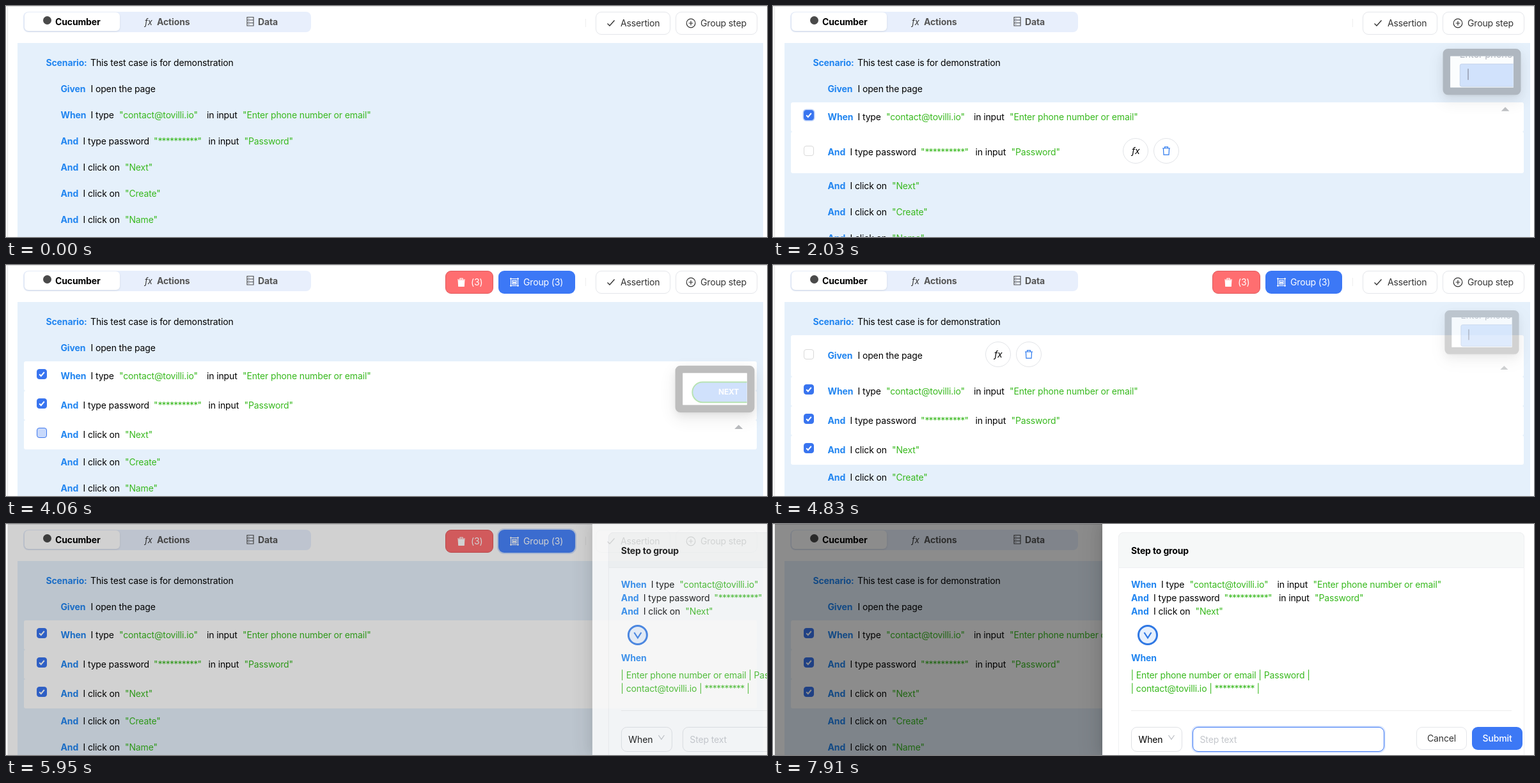
An HTML page that plays this animation: 1190 by 362 pixels, repeating every 8 s.

```html
<!DOCTYPE html>
<html lang="en">
<head>
<meta charset="utf-8">
<title>Group steps</title>
<style>
  html, body { margin: 0; width: 100%; height: 100%; overflow: hidden; background: #fff; }
  #stage { position: absolute; left: 0; top: 0; width: 1190px; height: 362px; overflow: hidden;
    font: 14px/20px Inter, "Noto Sans", sans-serif; letter-spacing: -.14px; color: #000; }
  #stage div, #stage span, #stage svg { position: absolute; box-sizing: border-box; white-space: pre; }
  svg { overflow: visible; fill: none; stroke-width: 1.2; }
  .key { color: #2185f0; font-weight: 700; }
  .str { color: #38b91e; }
  .bold { font-weight: 700; }
  .tab { color: #555; font-weight: 700; }
  .btn { color: #333; }
  .white { color: #fff; }
  .medium { font-weight: 500; }
  .hint { color: #c3c6cb; }
  .fx { font-style: italic; }
  .small { font-size: 13px; }
  .stars { font-style: normal; letter-spacing: -.8px; }
</style>
</head>
<body>
<div id="stage"></div>
<script>
const stage = document.getElementById('stage');
const LOOP = 8000, STEP = 70;
const BLUE = '#3c78f5';
const EMAIL = 'contact@tovilli.io', STARS = '<i class="stars">**********</i>';
const SHADOW = '0 6px 16px rgba(0,0,0,.08),0 3px 6px -4px rgba(0,0,0,.12),0 9px 28px 8px rgba(0,0,0,.05)';

// Each step: text end, then [x, text, class] parts
const click = (name, end) => [end, [86.5, 'And', 'key'], [121.5, 'I click on'], [187, `"${name}"`, 'str']];
const steps = [
  [232, [86.5, 'Given', 'key'], [133.5, 'I open the page']],
  [569, [86.5, 'When', 'key'], [133.5, 'I type'], [178, `"${EMAIL}"`, 'str'], [315, 'in input'],
    [371, '"Enter phone number or email"', 'str']],
  [447, [86.5, 'And', 'key'], [121.5, 'I type password'], [232, `"${STARS}"`, 'str'], [317.5, 'in input'],
    [373.5, '"Password"', 'str']],
  click('Next', 229), click('Create', 242), click('Name', 237)
];

// [step, pointer enters, pointer leaves]
const hovers = [[1, 1050, 2006], [2, 2006, 3006], [3, 3006, 4052], [2, 4200, 4460], [1, 4460, 4760], [0, 4760, 4895]];
const checkTimes = { 1: 1410, 2: 2810, 3: 4000 };

const ramp = (t, start, length) => Math.min(1, Math.max(0, (t - start) / length));
const easeOut = u => 1 - (1 - u) ** 2.2;

const box = (x, y, w, h, css = '', inner = '') =>
  `<div style="left:${x}px;top:${y}px;width:${w}px;height:${h}px;${css}">${inner}</div>`;
const text = (x, cy, s, cls = '') =>
  `<span class="${cls}" style="left:${x - 1}px;top:${cy - 10}px">${s}</span>`;
const icon = (cx, cy, color, shape) =>
  `<svg style="left:${cx}px;top:${cy}px" width="1" height="1" stroke="${color}">${shape}</svg>`;
const path = (d, extra = '') => `<path d="${d}" ${extra}/>`;
const button = (x, w, css = 'border:1px solid #e4e6ea;background:#fff', y = 8.5) =>
  box(x, y, w, 36, `border-radius:9px;${css}`);
const stepText = (step, dx, cy) => step.slice(1).map(([x, s, cls]) => text(x + dx, cy, s, cls)).join('');

const trash = path('M-6 -4H6M-2.5 -4V-6.2H2.5V-4M-4.6 -4L-4 6.2H4L4.6 -4');
const trashSolid = path('M-6 -4H6M-2 -4V-6H2V-4') + path('M-4.8 -2.6H4.8L4.2 6.4H-4.2Z', 'fill="#fff"');
const tick = path('M-5.5 .5L-2 4L5.5 -4.5', 'stroke-width="1.4"');
const plus = '<circle r="6.8"/>' + path('M-3.4 0H3.4M0 -3.4V3.4');
const sheet = path('M-5 -6.5H5V7H-5ZM-5 -2H5M-5 2.5H5M-2.8 -4.2h1M-2.8 .3h1M-2.8 4.8h1');
const groupIcon = path('M-5.5 -5.5H5.5V5.5H-5.5ZM-3 -2.8H3V-.4H-3ZM-3 1.2H3V3.2H-3Z') +
  path('M-7 -5.5h3M-5.5 -7v3M7 -5.5h-3M5.5 -7v3M-7 5.5h3M-5.5 7v-3M7 5.5h-3M5.5 7v-3');

function header(t, count) {
  let out = box(27, 9, 450, 32, 'background:#e8effc;border-radius:8px') +
    box(29, 10, 149, 29, 'background:#fff;border-radius:6px;box-shadow:0 1px 3px rgba(0,0,0,.1)') +
    box(58, 16, 13, 13, 'background:#4a4a4a;border-radius:50%') +
    text(78, 24.5, 'Cucumber', 'bold') +
    text(218, 24.5, 'fx', 'btn fx small') + text(237, 24.5, 'Actions', 'tab') +
    icon(381.5, 24, '#555', sheet) + text(395, 24.5, 'Data', 'tab') +
    box(906, 20, 1, 13, 'background:#eee') +
    button(922, 117) + icon(946, 27, '#333', tick) + text(962, 27, 'Assertion', 'btn') +
    button(1047, 128) + icon(1071, 27, '#333', plus) + text(1087, 27, 'Group step', 'btn');
  if (count > 1) {
    const hover = ramp(t, 5340, 250), ring = ramp(t, 5700, 150);
    out += button(687, 75, 'background:#ff6e70;border:1px solid #e0595c') +
      icon(711.5, 27, '#fff', trashSolid) + text(728, 27, `(${count})`, 'white') +
      button(770, 120, `background:rgb(${60 + 12 * hover},${120 + 12 * hover},${246 + 6 * hover});` +
        `box-shadow:0 0 0 ${2 * ring}px rgba(70,130,250,.25)`) +
      icon(795, 27, '#fff', groupIcon) + text(810, 27, `Group (${count})`, 'white');
  }
  return out;
}

function checkbox(cy, k, ring) {
  return box(48, cy - 8, 16, 16, `border-radius:4px;border:1px solid ${k ? '#3f78ee' : '#d9d9d9'};` +
    `background:rgba(56,116,240,${k});box-shadow:0 0 0 ${ring ? 1.5 : 0}px #b9cffa`) +
    (k > .7 ? icon(56, cy, '#fff', path('M-3.8 .2L-1.2 2.9L3.8 -3', 'stroke-width="2"')) : '');
}

function rows(t, hovered) {
  let y = 109.5, out = '';
  steps.forEach((step, i) => {
    const k = i in checkTimes ? ramp(t, checkTimes[i], 220) : 0;
    const over = i === hovered, h = over ? 65 : k ? 46 : 41, cy = y + h / 2;
    if (over || k) {
      const top = Math.round(y);
      out += box(28, top, 1146, h, 'background:#fff;border-radius:3px') +
        checkbox(cy - 2.5, k, i === 1 && t >= 1820 && t < 2170);
    }
    out += stepText(step, 0, cy);
    if (over) {
      const x = step[0] + 100, circle = 'border:1px solid #e2e4e8;border-radius:50%;background:#fff';
      out += box(x, cy - 22.5, 40, 40, circle) + text(x + 15, cy - 2.5, 'fx', 'fx') +
        box(x + 48, cy - 22.5, 40, 40, circle) + icon(x + 68, cy - 2.5, '#2a78ee', trash);
    }
    y += h;
  });
  return out;
}

// Small screenshot of the element a step acts on
function preview(step) {
  if (step === 3)
    return box(14, 13, 120, 34, 'background:#cfe0fc;border:2px solid #b5e2b0;border-radius:17px') +
      `<span class="white bold" style="left:56px;top:20px;font-size:12px">NEXT</span>`;
  return `<span style="left:15px;top:-13px;color:#a4a9b3;font-size:15px">${step === 1 ? 'Enter phone' : 'Password'}</span>` +
    box(15, 12, 90, 37, 'background:#cfe1fd;border:1px solid #bccde8;border-radius:3px') +
    box(28, 20, 1, 18, 'background:#667');
}

function tooltips(t) {
  return hovers.map(([step, enter, leave]) => {
    const shown = ramp(t, enter + 100, 200) * (1 - ramp(t, leave, 200));
    if (!step || !shown) return '';
    const rowTop = 104.5 + 46 * step;
    return box(1045.5, rowTop - 86, 125, 110,
      `opacity:${shown};transform:scale(${.8 + .2 * shown});transform-origin:62px 86px`,
      box(0, 0, 125, 74, `border:12px solid rgba(0,0,0,.27);border-radius:8px;box-shadow:${SHADOW}`) +
      box(12, 12, 101, 50, 'background:#fff;overflow:hidden', preview(step)) +
      icon(100, 97, 'none', path('M-6.5 3L0 -3.5L6.5 3Z', 'fill="#b5b7ba"')));
  }).join('');
}

function drawer(t) {
  const p = easeOut(ramp(t, 5887, 300));
  if (!p) return '';
  const hover = ramp(t, 6960, 210), focus = ramp(t, 7310, 250);
  const border = focus ? BLUE : `rgb(${223 - 140 * hover},${225 - 72 * hover},${229 + 24 * hover})`;
  const field = 'border-radius:9px;background:#fff;border:1px solid ';
  const content =
    box(25, 13, 635, 400, 'border:1px solid #eff0f2;border-radius:8px') +
    box(25, 13, 635, 56, 'background:#f6f8f8;border:1px solid #eff0f2;border-radius:8px 8px 0 0') +
    text(46, 41.5, 'Step to group', 'bold') +
    [1, 2, 3].map((n, i) => stepText(steps[n], -40.5, 95 + 21 * i)).join('') +
    box(55, 157.5, 32, 32, 'border:3px solid #2f78e4;border-radius:50%;background:#e6f0fd') +
    icon(71, 173.5, '#2f78e4', path('M-5.5 -4L0 4.5L5.5 -4', 'stroke-width="2.2"')) +
    text(46, 210, 'When', 'key') +
    text(45.5, 237, '| Enter phone number or email | Password |', 'str') +
    text(45.5, 258, `| ${EMAIL} | ${STARS} |`, 'str') +
    box(45, 292, 595, 1, 'background:#ededed') +
    box(45, 318, 80, 39, field + '#dfe1e5') + text(57.5, 337.5, 'When') +
    icon(108, 333.5, '#b8bbc0', path('M-4.5 -3L0 3.5L4.5 -3')) +
    box(141, 318, 300, 39, `${field}${border};box-shadow:0 0 0 ${2 * focus}px rgba(60,120,245,.18)`) +
    text(153.5, 337.5, 'Step text', 'hint') +
    (t >= 7420 && t < 7910 ? box(153, 329, 1, 17, 'background:#000') : '') +
    button(491, 79, undefined, 318) + text(509, 336, 'Cancel', 'btn') +
    button(578, 79, `background:${BLUE}`, 318) + text(595.5, 336, 'Submit', 'white medium');
  return box(3, 0, 1187, 362, `background:rgba(0,0,0,${.45 * p})`) +
    box(515, 0, 675, 362, `background:#fff;opacity:${.7 + .3 * p};transform:translateX(${675 * (1 - p)}px);` +
      'box-shadow:-6px 0 16px rgba(0,0,0,.08),-3px 0 6px -4px rgba(0,0,0,.12),-9px 0 28px 8px rgba(0,0,0,.05)', content);
}

function render(t) {
  const current = hovers.find(([, enter, leave]) => t >= enter && t < leave);
  const count = Object.values(checkTimes).filter(c => t > c).length;
  stage.innerHTML =
    box(0, 0, 1190, 1, 'background:#dedede') +
    box(2, 0, 1, 362, 'background:#e2e2e2') +
    header(t, count) +
    box(18, 58, 1166, 304, 'background:#e5f0fb') +
    text(63.5, 89, 'Scenario:', 'key') + text(133, 89, 'This test case is for demonstration') +
    rows(t, current ? current[0] : -1) +
    tooltips(t) + drawer(t);
}

let last = -1;
function update() {
  const t = Math.floor(performance.now() % LOOP / STEP) * STEP;
  if (t !== last) render(last = t);
  requestAnimationFrame(update);
}
update();
</script>
</body>
</html>
```
